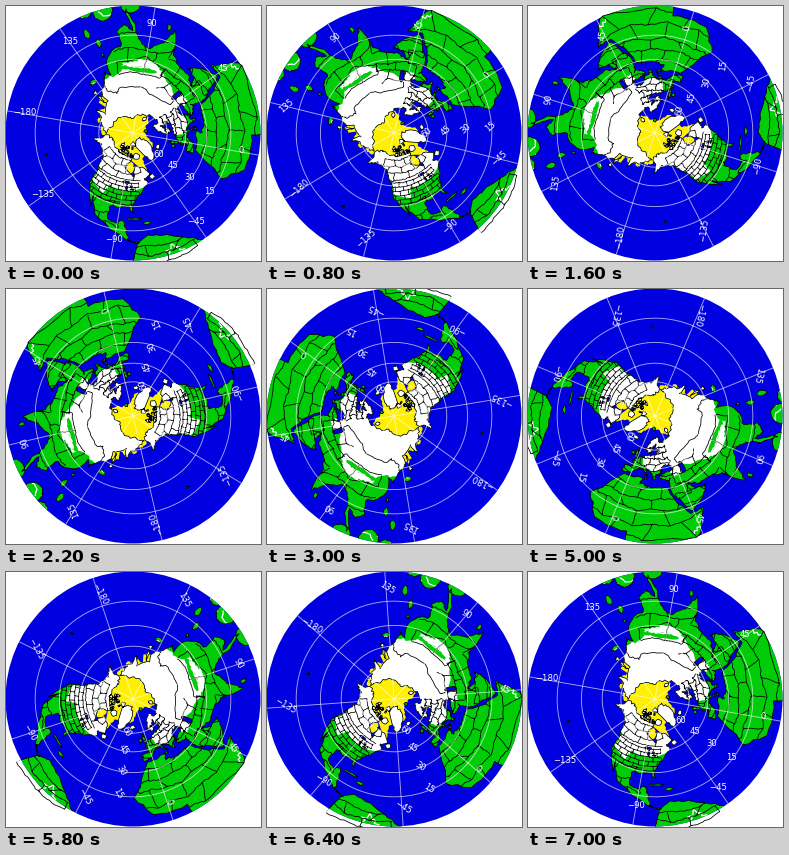
A matplotlib script that plays this animation: 255 px wide and 255 px high, repeating every 7.2 s.

```python
import numpy as np
import matplotlib.pyplot as plt
from matplotlib.animation import FuncAnimation
from matplotlib.patches import Circle, PathPatch
from matplotlib.path import Path
from matplotlib.transforms import Affine2D

R = 127.5            # radius of the equator in pixels
PX = 72 / 60         # points per pixel
STEPS = 35           # steps in one full turn
BLUE, GREEN, YELLOW = "#0000e0", "#00cc08", "#fff000"
rng = np.random.default_rng(4)

# Key points of the coasts as (lon, lat); the detail between them is random
EURASIA = [
    (-9, 43), (-8, 37), (0, 38), (4, 43.4), (10, 43.5), (16, 38.5), (13, 45),
    (19, 41.5), (22, 37), (24, 40.5), (29, 41), (30, 46), (39, 47), (41, 42),
    (33, 42), (27, 39), (30, 36.5), (36, 36.5), (34.8, 29), (39, 21),
    (44, 12.8), (52, 16), (59.5, 22.5), (52, 24.5), (48, 29.5), (57, 26),
    (67, 25), (73, 19), (77.5, 8), (81, 16), (90, 22.5), (97, 17), (99, 9),
    (103.5, 1.5), (100, 13), (105, 9), (109, 12), (107, 20), (115, 22.5),
    (121.5, 29), (121, 38), (126, 35), (128, 39.5), (140, 49), (137, 54),
    (155, 61), (156, 51.5), (163, 58), (178, 62.5), (190, 66), (170, 70),
    (130, 72), (105, 77.5), (75, 72), (44, 67), (35, 66), (26, 71), (14, 67),
    (5, 61), (11, 59), (16, 56.5), (18, 61), (24, 65.5), (22, 60.5), (30, 60),
    (22, 56), (10, 54.5), (1.5, 50.8), (-4, 48.4), (-1.3, 44)]
AFRICA = [
    (-6, 36), (10, 37), (11, 33), (20, 31), (32, 31), (37, 21), (43, 11.5),
    (51, 12), (42, -2), (40, -8), (10, -8), (9, 4), (-8, 4.5), (-17, 14),
    (-10, 30)]
NORTH_AMERICA = [
    (-168, 66), (-156, 71), (-128, 70), (-95, 69), (-82, 68), (-94, 59),
    (-82, 54), (-79, 52), (-77, 61), (-65, 59), (-56, 52), (-66, 49),
    (-62, 46), (-70, 42), (-76, 36), (-81, 31), (-80, 26), (-84, 30),
    (-97, 28), (-97, 20), (-91, 18.5), (-87, 21), (-84, 15), (-83, 10),
    (-77, 8), (-86, 11), (-105, 20), (-113, 31), (-110, 23), (-121, 35),
    (-124, 47), (-134, 57), (-150, 60.5), (-163, 55), (-161, 62)]
SOUTH_AMERICA = [(-78, 8), (-72, 12), (-60, 9), (-50, 3), (-44, -3), (-40, -9),
                 (-60, -9), (-80, -8), (-80, 0)]
GREENLAND = [(-72, 78), (-60, 82), (-32, 83.5), (-19, 78), (-24, 70),
             (-43, 60), (-54, 68)]
# Islands and lakes as ellipses: lon, lat, half width, half height
ISLES = [
    (-72, 69, 8, 2.5), (-80, 80, 11, 2), (-19, 65, 5, 1.3), (-2.5, 54, 2, 3.5),
    (-8, 53.3, 2, 1.5), (60, 74, 5, 2), (18, 78.5, 7, 1.3), (-56, 49, 3, 1.8),
    (143, 50, .8, 4), (143, 43.3, 2, 1.4), (138, 36.3, 3.5, 1.5),
    (121, 23.6, .7, 1.3), (121, 16, 1.2, 2.5), (125, 9, 1.5, 2.5),
    (114, 1, 4.5, 4.5), (101, 0, 4.5, 3.5), (122, 0, 2.5, 1.5), (81, 7.8, 1, 1.6),
    (-79, 21.8, 5, .7), (-71, 19, 2.5, .8), (14, 37.5, 1.4, .6),
    (-155.5, 19.6, .6, .6)]
LAKES = [(51, 41.5, 2.2, 4.5), (-88, 47.6, 3.5, .7), (-86.8, 43.7, .9, 2),
         (-82, 44.5, 1.3, 1), (-81, 42, 2, .5)]
ICE = [(-175, 61.5), (-160, 66), (-128, 69), (-82, 66), (-60, 55), (-60, 65),
       (-45, 72), (-24, 69), (0, 79), (35, 77.5), (57, 70), (100, 74),
       (165, 67), (178, 62), (185, 61.5)]
ICE_BAYS = [(-85, 59.5, 7, 4), (143, 54, 5, 6), (152, 58, 6, 2), (167, 59, 5, 1.5)]
SNOW_EAST = [
    (3, 63), (8, 46), (20, 43), (35, 45), (40, 37), (49, 38), (52, 43),
    (70, 37), (82, 29.5), (95, 30), (104, 33), (114, 39), (128, 40), (140, 37),
    (160, 48), (195, 60), (195, 75), (100, 82), (15, 75)]
SNOW_WEST = [
    (-170, 52), (-150, 57), (-124, 49), (-121, 38), (-106, 36), (-104, 41),
    (-74, 41.5), (-50, 46), (-45, 57), (-10, 64), (-10, 82), (-60, 86),
    (-120, 80), (-170, 68)]
NORTH_FRONTIER = [(49, 46), (47, 50), (62, 53), (77, 53.5), (87, 49.2),
                  (98, 50.5), (117, 49.7), (122, 53), (131, 48), (131, 43)]


def project(lon, lat):
    """North polar stereographic, 80 W pointing down."""
    r = R * np.tan(np.radians(90 - np.asarray(lat, float)) / 2)
    a = np.radians(100 - np.asarray(lon, float))
    return np.column_stack([r * np.sin(a), r * np.cos(a)])


def trace(points, wobble, n=5):
    lon, lat = np.array(points, float).T
    k = np.arange(len(lon))
    t = np.arange((len(lon) - 1) * n + 1) / n
    xy = project(np.interp(t, k, lon), np.interp(t, k, lat))
    return xy + rng.normal(0, wobble, xy.shape)


def ring(xy):
    """Closed path, always wound the same way."""
    x, y = xy.T
    if x @ np.roll(y, -1) < y @ np.roll(x, -1):
        xy = xy[::-1]
    return Path(np.vstack([xy, xy[:1]]), closed=True)


def shape(points, wobble=0.6):
    return ring(trace(points, wobble))


def blob(lon, lat, w, h, wobble=0.35):
    a = np.linspace(0, 2 * np.pi, 14, endpoint=False)
    xy = project(lon + w * np.cos(a), lat + h * np.sin(a))
    return ring(xy + rng.normal(0, wobble, xy.shape))


def mesh(lon, lat, jitter, wobble):
    """Brick pattern of borders; lon and lat are (start, stop, step)."""
    x, y = np.meshgrid(np.arange(*lon), np.arange(*lat))
    x = x + rng.normal(0, jitter * lon[2], x.shape)
    y = y + rng.normal(0, jitter * lat[2], y.shape)
    nodes = np.dstack([x, y])
    paths = [Path(trace(row, wobble)) for row in nodes]
    for i, j in np.ndindex(len(nodes) - 1, nodes.shape[1]):
        if (i + j) % 2 == 0:
            paths.append(Path(trace(nodes[i:i + 2, j], wobble)))
    return paths


join = Path.make_compound_path

fig = plt.figure(figsize=(4.25, 4.25), dpi=60, facecolor="white")
ax = fig.add_axes([0, 0, 1, 1])
ax.set_xlim(-R + 0.5, R + 0.5)
ax.set_ylim(-R - 0.5, R - 0.5)
ax.axis("off")
disc = ax.add_patch(Circle((0, 0), R, fc=BLUE, lw=0))
layers, on_land = [], []


def add(paths, inside=False, **style):
    patch = ax.add_patch(PathPatch(join(*paths), **style))
    patch.set_clip_path(disc)
    layers.append(patch)
    if inside:
        on_land.append(patch)


def fill(paths, color, inside=False):
    add(paths, inside, fc=color, lw=0)


def stroke(paths, color, width, inside=False, alpha=1):
    add(paths, inside, fill=False, ec=color, lw=width * PX, alpha=alpha)


arctic_isles = [blob(lon, rng.uniform(69.5, 77), rng.uniform(3, 6),
                     rng.uniform(.7, 1.6)) for lon in np.linspace(-122, -82, 14)]
coasts = [shape(c) for c in (EURASIA, AFRICA, NORTH_AMERICA, SOUTH_AMERICA,
                             GREENLAND)]
coasts += [blob(*isle) for isle in ISLES] + arctic_isles
lakes = [blob(*lake) for lake in LAKES]
land = join(*coasts)

# Seeded streaks of snow over the high plateau, and specks near the equator
s = np.linspace(0, 1, 9)
streaks = [Path(trace(np.column_stack([78 + 30 * s, lat + 2 * np.sin(3 * s)]),
                      0.9, 2)) for lat in (31.5, 33, 38)]
streaks += [Path(trace([(lon - 5, 2), (lon, 4), (lon + 4, 0)], 1.5))
            for lon in (46, 113, 122, -60)]

fill([shape(ICE)] + [blob(*bay, 0.8) for bay in ICE_BAYS], YELLOW)
fill(coasts, GREEN)
fill([shape(SNOW_EAST, 0.9), shape(SNOW_WEST, 0.9)], "white", inside=True)
fill([blob(93, 36.5, 16, 2.2, 0.9)], GREEN)
stroke(streaks, "white", 1.2, inside=True)
fill(lakes, BLUE)

stroke(coasts + lakes, "black", 0.75)
countries = [Path(trace(NORTH_FRONTIER, 0.5))]
for lon, lat in (((-16, 52, 9), (2, 36, 7)),          # Africa
                 ((-8, 42, 6), (39, 62, 4.5)),        # Europe
                 ((38, 76, 9), (17, 46, 7)),          # Middle East
                 ((75, 112, 9), (15, 46, 8)),         # South Asia
                 ((-110, -82, 7), (10, 32, 7)),       # Central America
                 ((-79, -44, 7), (-2, 10, 4))):       # South America
    countries += mesh(lon, lat, 0.17, 0.4)
stroke(countries, "black", 0.8, inside=True)
states = mesh((-124, -70, 4.2), (31, 50, 3.2), 0.06, 0.15)
states += mesh((-140, -60, 10), (49, 67, 5.5), 0.1, 0.3)
stroke(states, "black", 0.75, inside=True)

meridians = range(-180, 180, 45)
around = np.linspace(0, 360, 181)
grid = [Path(project([m, m], [90, 0])) for m in meridians]
grid += [Path(project(around, np.full(181, lat))) for lat in (15, 30, 45, 60)]
stroke(grid, "white", 0.9, alpha=0.65)

labels = []


def label(value, spot):
    text = ax.text(*spot, str(value).replace("-", "\u2212"), color="white",
                   family="DejaVu Sans", size=8.5 * PX, ha="center",
                   va="center")
    labels.append((text, spot))


for m in meridians:
    label(m, project([m], [8.5])[0] + (0, 1.5))
for lat in (15, 30, 45, 60):
    r = R * np.tan(np.radians(45 - lat / 2))
    label(lat, (0.8 * r - 2, -0.59 * r - 1))


def update(i):
    angle = 360 * (i % STEPS) / STEPS
    turn = Affine2D().rotate_deg(angle)
    view = turn + ax.transData
    for layer in layers:
        layer.set_transform(view)
    for layer in on_land:
        layer.set_clip_path(land, view)
    for text, spot in labels:
        text.set_position(turn.transform(spot))
        text.set_rotation(angle)
    return layers


anim = FuncAnimation(fig, update, frames=36, interval=200, repeat=True,
                     repeat_delay=0, blit=False)
plt.show()
```
